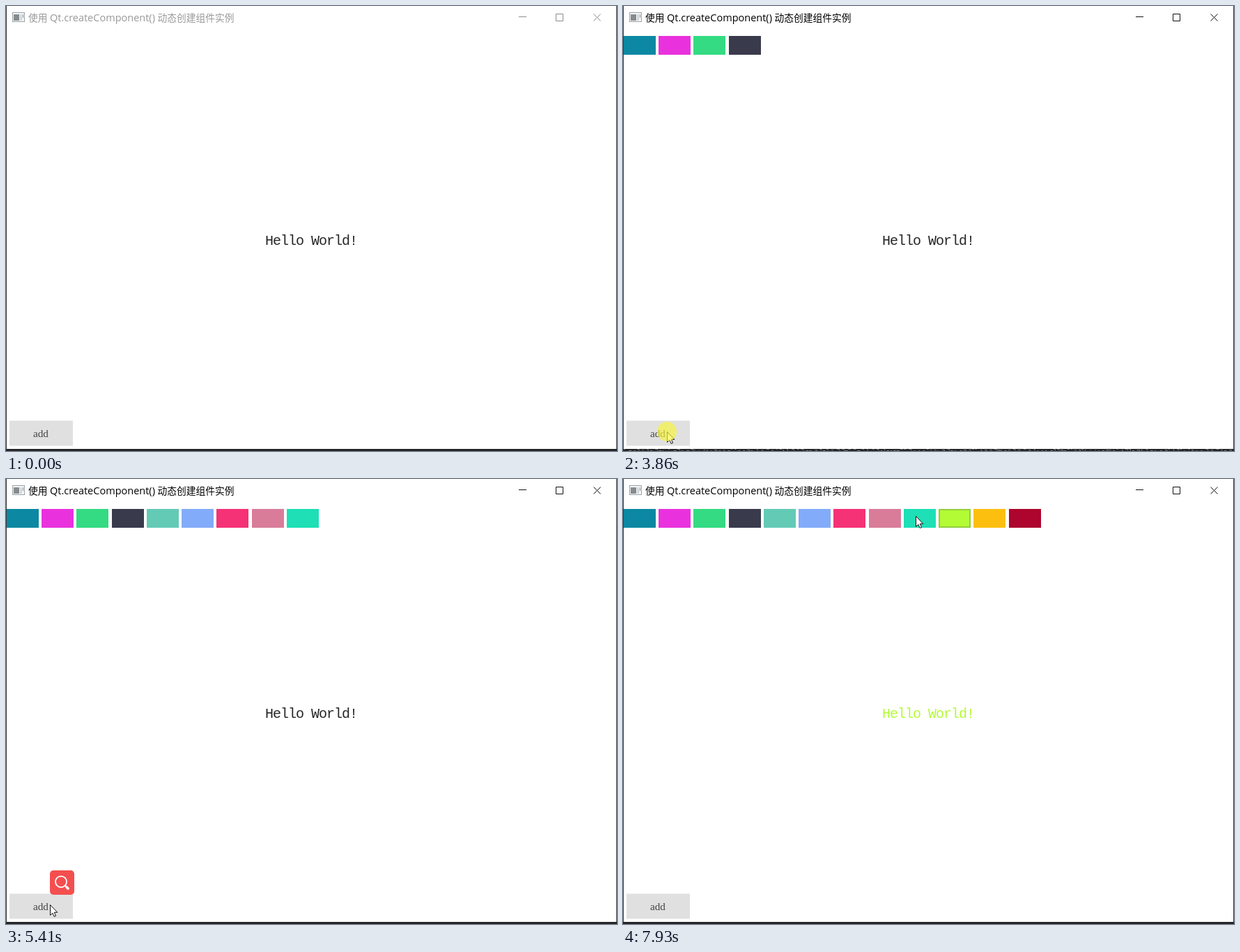
Animation of 877 by 639 pixels, one loop 8 s. Source, as an HTML page:

```html
<!DOCTYPE html>
<html lang="zh">
<head>
<meta charset="utf-8">
<style>
  html, body { margin: 0; width: 100%; height: 100%; overflow: hidden; background: #fff; }
  svg { display: block; width: 877px; height: 639px; }
  .cjk { font: 13.75px "Noto Sans CJK SC", "Noto Sans CJK", sans-serif; }
  .latin { font: 14.5px "Open Sans", sans-serif; }
  .hello { font: 20px "Liberation Mono", monospace; letter-spacing: -1px; }
  .label { font: 15.2px "Liberation Serif", serif; fill: #444; }
</style>
</head>
<body>
<svg viewBox="0 0 877 639">
  <rect width="877" height="639" fill="#fff"/>
  <path d="M.5 0V639M876.5 0V639" stroke="#38393a"/>
  <rect y="636" width="877" height="3" fill="#242527"/>
  <path id="scraps" fill="none"/>

  <rect x="9.5" y="9.5" width="17" height="13" fill="#f4f6f7" stroke="#9ba1a5"/>
  <rect x="11" y="12" width="8" height="9" fill="#858b8e"/>
  <rect x="20" y="12" width="3" height="9" fill="#d3d7d9"/>
  <path d="M24.5 12V17" stroke="#8a9094"/>

  <g id="title">
    <text class="cjk" x="32" y="22">使用</text>
    <text class="latin" x="63" y="22">Qt.createComponent()</text>
    <text class="cjk" x="217.5" y="22">动态创建组件实例</text>
  </g>
  <path id="controls" fill="none" d="M736 15.5H747M789.5 11.5H799.5V21.5H789.5ZM843.5 11.5L853.5 21.5M853.5 11.5L843.5 21.5"/>

  <g id="swatches"></g>
  <text id="hello" class="hello" x="372" y="342.5">Hello World!</text>

  <rect id="button" x="5" y="595.5" width="91" height="36"/>
  <text class="label" x="39" y="618.5">add</text>

  <g id="search">
    <rect x="63" y="562" width="35" height="35" rx="5" fill="#f44f4f"/>
    <g fill="none" stroke="#fff" stroke-width="1.8" stroke-linecap="round">
      <circle cx="79" cy="578.3" r="8"/>
      <path d="M84.8 584L87 586"/>
      <path d="M87 586L89 588" stroke-width="3.6"/>
    </g>
  </g>

  <g id="cursor">
    <path d="M.5 .5V15.4L3.9 12.3L6.2 17.4L8.6 16.4L6.3 11.3H10.8Z" fill="#fff" stroke="#111"/>
    <circle id="halo" r="14" fill="#f8f43c" opacity=".68"/>
  </g>
</svg>
<script>
const LOOP = 8000;
const $ = id => document.getElementById(id);
const show = (id, on) => $(id).setAttribute("visibility", on ? "inherit" : "hidden");
const paint = (id, color, part = "fill") => $(id).setAttribute(part, color);

const colors = `#0c88a2 #e932dd #34db82 #393b4c #63cab6 #82abf9
  #f53276 #d97c9a #1edfb6 #b3fb34 #fdbf0f #ad052d`.split(/\s+/);

const click = (at, held) => ({ at, end: at + held });

// Slow clicks, then a steady run: each one adds a swatch.
const adds = [click(1440, 240), click(2160, 70), click(2850, 70), click(3320, 250)];
while (adds.length < colors.length) {
  adds.push(click(3860 + 320 * (adds.length - 4), 150));
}

// Clicks on swatches: each one colors the text.
const picks = [
  { ...click(6950, 100), swatch: 10 },
  { ...click(7460, 220), swatch: 9 }
];

const legs = [
  { from: 130, to: 890, x: 40, y: 620 },
  { from: 2380, to: 2700, x: 63, y: 611 },
  { from: 6260, to: 6940, x: 522, y: 60 },
  { from: 7080, to: 7460, x: 485, y: 54 },
  { from: 7680, to: 7930, x: 420, y: 53 }
];

function pointerAt(t) {
  let x = 469, y = 538;
  for (const leg of legs) {
    const p = Math.min(1, Math.max(0, (t - leg.from) / (leg.to - leg.from)));
    const eased = p * p * (3 - 2 * p);
    x += (leg.x - x) * eased;
    y += (leg.y - y) * eased;
  }
  return [Math.round(x), Math.round(y)];
}

// Tops of text lines peeking out below the window.
function scraps(seed) {
  const random = () => (seed = (seed * 16807) % 2147483647) / 2147483647;
  let d = "";
  for (let x = 1; x < 872; x += 4 + random() * 4) {
    d += `M${x.toFixed(1)} ${636.5 + Math.floor(random() * 3)}h${(1 + random() * 3).toFixed(1)}`;
    if (random() < .5) d += "v2";
  }
  return d;
}
$("scraps").setAttribute("d", scraps(41));

const tiles = colors.map((color, i) => {
  const tile = document.createElementNS("http://www.w3.org/2000/svg", "g");
  const x = Math.round(0.9 + 50.25 * i);
  tile.innerHTML = `<rect x="${x}" y="43" width="46" height="27" fill="${color}"/>
    <rect x="${x + 1}" y="44" width="44" height="25" fill="none" stroke="#92cf3c" stroke-width="2"/>`;
  $("swatches").append(tile);
  return tile;
});

function render(t) {
  const held = c => t >= c.at && t < c.end;
  const active = t >= adds[0].at;
  paint("title", active ? "#000" : "#999");
  paint("controls", active ? "#111" : "#8c8c8c", "stroke");

  const pick = picks.filter(c => t >= c.end).pop();
  tiles.forEach((tile, i) => {
    tile.setAttribute("visibility", t >= adds[i].end ? "visible" : "hidden");
    tile.lastElementChild.style.display = pick && pick.swatch === i ? "" : "none";
  });
  paint("hello", pick ? colors[pick.swatch] : "#262626");

  const down = adds.some(c => held(c) && t > c.at + 25);
  paint("button", down ? "#cfcfcf" : "#e0e0e0");

  $("cursor").setAttribute("transform", `translate(${pointerAt(t)})`);
  show("cursor", t >= legs[0].from);
  show("halo", t >= legs[0].from && [...adds, ...picks].some(held));
  show("search", t >= 5330 && t < 6700);
  show("scraps", t >= 3570 && t < 5330);
  paint("scraps", t < 4730 ? "#77797b" : "#168a83", "stroke");
}

const start = performance.now();
function tick() {
  render((performance.now() - start) % LOOP);
  requestAnimationFrame(tick);
}
tick();
</script>
</body>
</html>
```
